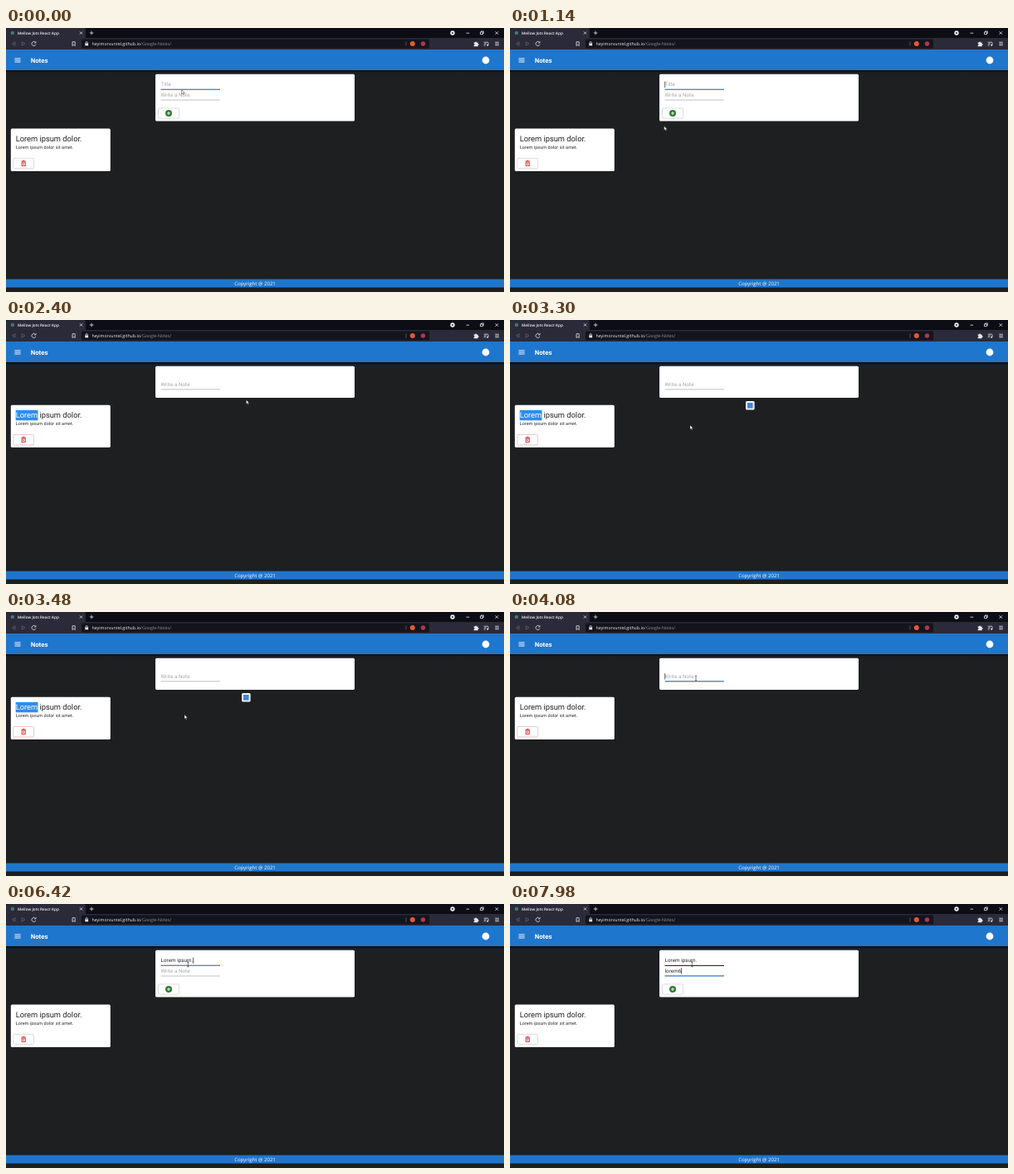
Recreate the animation shown at these times as an HTML page. Size 600 px wide and 319 px high, loop 8 s.

```html
<!DOCTYPE html>
<html lang="en">
<head>
<meta charset="utf-8">
<title>Notes</title>
<style>
  html, body { margin: 0; width: 100%; height: 100%; overflow: hidden; background: #1e1f21; }
  svg { display: block; width: 100vw; height: 100vh; }
  text { font-family: Roboto, sans-serif; text-rendering: geometricPrecision; white-space: pre; }
  .ui { font-family: "Open Sans", "Noto Sans", sans-serif; }
  .line { fill: none; stroke: #e6e6ec; stroke-width: .8; }
  .dim { stroke: #62626f; }
  .input { font-size: 6.25px; letter-spacing: .00938em; fill: #262626; }
  .empty { fill: #a6a6a6; }
  .focus { fill: #1976d2; }
  .btn { fill: #fff; stroke-width: .6; }
</style>
</head>
<body>
<svg viewBox="0 0 600 319" preserveAspectRatio="none">
  <defs>
    <linearGradient id="shade" x2="0" y2="1">
      <stop stop-color="#08090b"/>
      <stop offset="1" stop-color="#08090b" stop-opacity="0"/>
    </linearGradient>
  </defs>
  <rect width="600" height="319" fill="#1e1f21"/>

  <!-- browser window -->
  <rect width="600" height="26" fill="#0d0d16"/>
  <path d="M0 12V2Q0 0 2 0H94Q96 0 96 2V12H600V26H0Z" fill="#2a2a39"/>
  <rect x="91" y="13.5" width="419" height="11" rx="1.5" fill="#14141d"/>
  <circle cx="7.8" cy="6" r="2.2" fill="#3f7c6c"/>
  <text class="ui" x="14" y="7.8" font-size="4.7" font-weight="600" fill="#f2f2f5">Mellow Jots React App</text>
  <g class="line">
    <path d="M89 4.5l3 3m0-3l-3 3M100.8 6h4.6M103.1 3.7v4.6"/>
    <path d="M554.5 6.2h3.6M571.5 4.9h2.8v2.8h-2.8zM572.5 4.9v-1h2.8v2.8h-1M589.5 4.2l3.6 3.6m0-3.6l-3.6 3.6"/>
    <path class="dim" d="M11 16.8v4.4l-3.6-2.2zM19.2 16.8v4.4l3.6-2.2z"/>
    <path d="M35.4 17.3a2.5 2.5 0 1 0 .5 2.5M36 16.2v1.7h-1.8"/>
    <path d="M80 16.7h3.2v4.8l-1.6-1.3-1.6 1.3z"/>
    <path d="M96 18.8v-1a1.2 1.2 0 0 1 2.4 0v1"/>
    <path d="M575.8 17.2h5M575.8 19h3M575.8 20.8h2M581 17.6v3M589.3 17.2h4.6M589.3 19h4.6M589.3 20.8h4.6"/>
    <path class="dim" d="M482 16.5v5"/>
  </g>
  <rect x="95.3" y="18.5" width="3.8" height="2.8" fill="#e6e6ec"/>
  <circle cx="580.2" cy="20.8" r="1" fill="#e6e6ec"/>
  <path d="M563.6 17.5h1.5a1 1 0 0 1 2 0h1.5v1.4a1 1 0 0 1 0 2v1.4h-5v-1.5a1 1 0 0 0 0-2z" fill="#e6e6ec"/>
  <circle cx="538" cy="6" r="2.7" fill="#f2f2f5"/>
  <circle cx="538" cy="6" r=".9" fill="#0d0d16"/>
  <circle cx="489.8" cy="19" r="3" fill="#e8582f"/>
  <circle cx="502.5" cy="19" r="2.7" fill="#b5364f"/>
  <text class="ui" x="103.5" y="20.9" font-size="5.25" fill="#f0f0f4">heyimorvuntel.github.io<tspan fill="#8f8f9a">/Google-Notes/</tspan></text>

  <!-- page -->
  <rect y="51" width="600" height="3" fill="url(#shade)"/>
  <rect y="26" width="600" height="25" fill="#1f76cd"/>
  <path d="M10.4 36.9h7.2M10.4 39h7.2M10.4 41.1h7.2" stroke="#fff" stroke-width=".9"/>
  <text x="29.7" y="41.7" font-size="7.8" font-weight="700" fill="#fff">Notes</text>
  <circle cx="578" cy="39" r="4.4" fill="#fff"/>
  <rect y="303.5" width="600" height="10" fill="#1f76cd"/>
  <text class="ui" x="300" y="310.8" font-size="6.05" text-anchor="middle" fill="#fff">Copyright @ 2021</text>

  <rect id="form" x="180" y="55.7" width="240" height="56.8" rx="1.6" fill="#fff"/>
  <g id="title">
    <text class="input" x="186.5" y="70.4"></text>
    <rect class="rest" x="186.5" width="71.5" y="74" height=".5"/>
    <rect class="focus" y="73.7" height="1"/>
    <rect class="caret" y="64.6" width=".6" height="7.4"/>
  </g>
  <g id="note">
    <text class="input" x="186.5" y="83.1"></text>
    <rect class="rest" x="186.5" width="71.5" y="86.7" height=".5"/>
    <rect class="focus" y="86.4" height="1"/>
    <rect class="caret" y="77.2" width=".6" height="7.4"/>
  </g>
  <g id="add">
    <rect class="btn" x="183.5" y="96.9" width="25" height="12.2" rx="1.5" stroke="#c3c9c3"/>
    <circle cx="196" cy="103" r="4" fill="#2e7d32"/>
    <path d="M194 103h4M196 101v4" stroke="#fff" stroke-width=".9"/>
  </g>

  <g id="card">
    <rect x="5.8" y="121.6" width="120" height="51.4" rx="1.6" fill="#fff"/>
    <rect id="mark" x="11.7" y="127.8" width="26.8" height="12.4" fill="#318ce7"/>
    <text x="11.7" y="137" font-size="9.3" fill="#202020"><tspan id="word">Lorem</tspan> ipsum dolor.</text>
    <text x="11.7" y="146" font-size="5.45" letter-spacing=".058" fill="#262626">Lorem ipsum dolor sit amet.</text>
    <rect id="del" class="btn" x="8.8" y="157.4" width="24.8" height="12.4" rx="1.5"/>
    <path d="M18.3 161h5.8M20 160.4h2.4M19 162.2h4.4v4.4h-4.4zM20.2 163.4l2 2m0-2l-2 2" fill="none" stroke="#d32f2f" stroke-width=".9"/>
  </g>

  <g id="popup">
    <rect x="284" y="98" width="10.6" height="10.6" rx="1.5" fill="#f4f5f7"/>
    <rect x="286" y="100" width="6.6" height="6.6" fill="#4285d8"/>
  </g>
  <g id="pointer">
    <path id="arrow" d="M0 0V5.2L1.2 4.1L2 5.9L2.9 5.5L2.1 3.8H3.7Z" fill="#fff" stroke="#222" stroke-width=".45"/>
    <path id="beam" d="M-1.2 -2.8H1.2M0 -2.8V2.8M-1.2 2.8H1.2" stroke="#222" stroke-width=".6"/>
  </g>
</svg>
<script>
const $ = id => document.getElementById(id);
const LOOP = 8000, STEP = 60;
const COLLAPSE = 2280, SELECT = 2340, POPUP = 2580, NOTE_CLICK = 3960, EXPAND = 4140;
const TITLE_CLICK = 4380, TAB = 6780;

// time, x, y
const path = [
  [0, 211.6, 74.6], [300, 196, 103], [840, 196, 103], [1140, 185.7, 118.4],
  [1260, 185, 120], [1440, 185, 120], [2220, 289.4, 96.4], [2460, 289.4, 96.4],
  [3300, 217, 127], [3480, 215, 124], [3900, 224, 80], [4140, 224, 80],
  [4380, 219.3, 73], [LOOP, 219.3, 73]
];

// time, field, value
const edits = [
  ...typing('title', 'lorem2', [5640, 5700, 5820, 5880, 5940, 6120]),
  [6420, 'title', 'Lorem ipsum.'],
  ...typing('note', 'lorem6', [7080, 7140, 7260, 7320, 7440, 7740])
];
const focuses = [[10, 'title'], [COLLAPSE, ''], [NOTE_CLICK, 'note'], [TITLE_CLICK, 'title'], [TAB, 'note']];
const hints = { title: 'Title', note: 'Write a Note' };

function typing(field, word, times) {
  return times.map((time, i) => [time, field, word.slice(0, i + 1)]);
}

function show(el, on) { el.style.display = on ? '' : 'none'; }

function pointerAt(t) {
  const i = path.findIndex(p => p[0] > t);
  const [t0, x0, y0] = path[i - 1], [t1, x1, y1] = path[i];
  const u = (t - t0) / (t1 - t0), k = u * u * (3 - 2 * u);
  return [x0 + (x1 - x0) * k, y0 + (y1 - y0) * k];
}

function drawField(name, t, focus, hovered) {
  const g = $(name), text = g.querySelector('text');
  const last = edits.filter(e => e[1] === name && e[0] <= t).pop();
  const value = last ? last[2] : '';
  text.textContent = value || hints[name];
  text.classList.toggle('empty', !value);

  const rest = g.querySelector('.rest');
  rest.setAttribute('fill', hovered ? '#222' : '#999');
  rest.setAttribute('height', hovered ? 1 : .6);

  const active = focus[1] === name;
  const grow = !active ? 0 : focus[0] < STEP ? 1 : Math.min(1, (t - focus[0] + STEP) / 200);
  const bar = g.querySelector('.focus'), width = 71.5 * (1 - (1 - grow) ** 2);
  bar.setAttribute('x', 222.25 - width / 2);
  bar.setAttribute('width', width);

  const since = t - Math.max(focus[0], last ? last[0] : 0);
  const caret = g.querySelector('.caret');
  show(caret, active && Math.floor(since / 530) % 2 === 0);
  caret.setAttribute('x', 186.5 + (value ? text.getComputedTextLength() : 0));
}

function draw(now) {
  const t = Math.floor(now % LOOP / STEP) * STEP;
  const collapsed = t >= COLLAPSE && t < EXPAND;
  const selected = t >= SELECT && t < NOTE_CLICK;
  const focus = focuses.filter(f => f[0] <= t).pop() || focuses[0];

  $('form').setAttribute('height', collapsed ? 38.2 : 56.8);
  show($('title'), !collapsed);
  show($('add'), !collapsed);
  $('note').setAttribute('transform', `translate(0 ${collapsed ? -3.1 : 0})`);
  $('card').setAttribute('transform', `translate(0 ${collapsed ? -18.9 : 0})`);
  $('del').setAttribute('stroke', collapsed ? '#e0a3ae' : '#cbbfc0');
  drawField('title', t, focus, t >= TAB);
  drawField('note', t, focus, false);

  show($('mark'), selected);
  $('word').setAttribute('fill', selected ? '#fff' : '#202020');
  show($('popup'), t >= POPUP && t < NOTE_CLICK);

  const [x, y] = pointerAt(t), overInput = t >= 3840;
  $('pointer').setAttribute('transform', `translate(${x} ${y})`);
  show($('arrow'), !overInput);
  show($('beam'), overInput);
}

let start;
function tick(now) {
  start ??= now;
  draw(now - start);
  requestAnimationFrame(tick);
}
draw(0);
requestAnimationFrame(tick);
</script>
</body>
</html>
```
